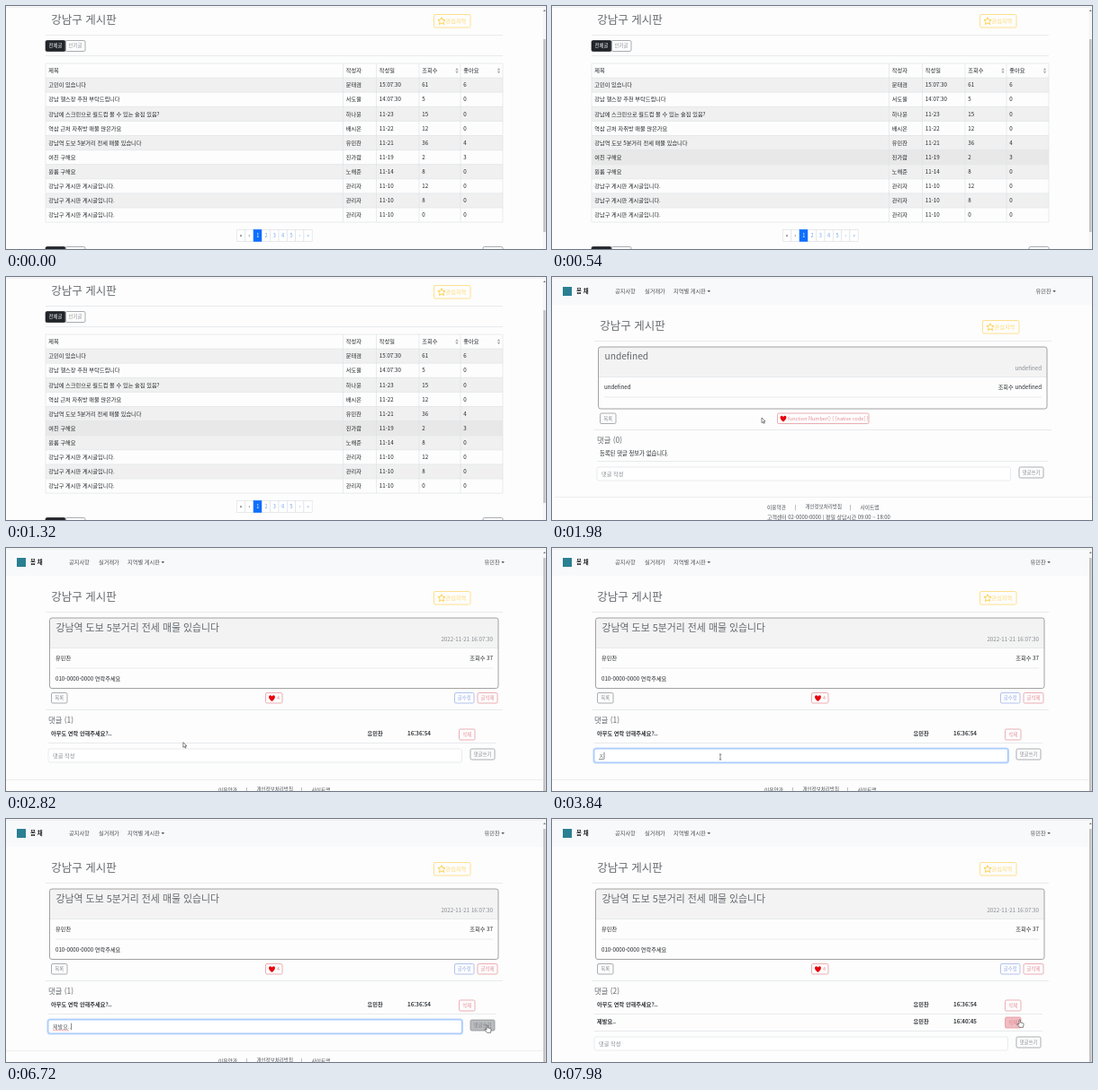
These frames come from a looping animation (600x271 px, 8000 ms). An HTML page:

```html
<!DOCTYPE html>
<html lang="ko">
<head>
<meta charset="utf-8">
<style>
html, body { margin: 0; width: 100%; height: 100%; overflow: hidden; background: #fdfdfd; }
svg { display: block; width: 600px; height: 271px; }
text { font-family: "Noto Sans CJK KR", "Noto Sans CJK", "Noto Serif", sans-serif; white-space: pre; }
</style>
</head>
<body>
<svg id="stage" viewBox="0 0 600 271"></svg>
<script>
const LOOP = 8000, OPEN = 1860, LOADED = 2100, FOCUS = 3060, SENT = 6840;
const INK = '#212529', SOFT = '#4c5157', TITLE = '#64696e', GRAY = '#858b91', LINE = '#dee2e6';
const RED = '#e48b94', GOLD = '#ffd970', BLUE = '#0d6efd';
const stage = document.getElementById('stage');

// y is the vertical middle of the text
const text = (x, y, s, size = 6.2, fill = INK, anchor = 'start', weight = 400) =>
  `<text x="${x}" y="${y + size * .36}" font-size="${size}" fill="${fill}" text-anchor="${anchor}" font-weight="${weight}">${s}</text>`;
const bold = (x, y, s) => text(x, y, s, 6.2, '#33373b', 'start', 700);
const rect = (x, y, w, h, fill, stroke = 'none', r = 0, sw = .7) =>
  `<rect x="${x}" y="${y}" width="${w}" height="${h}" rx="${r}" fill="${fill}" stroke="${stroke}" stroke-width="${sw}"/>`;
const path = (d, fill, stroke = 'none', sw = .7) =>
  `<path d="${d}" fill="${fill}" stroke="${stroke}" stroke-width="${sw}" stroke-linejoin="round"/>`;
const hline = (x1, x2, y, color = LINE) => path(`M${x1} ${y}H${x2}`, 'none', color);
const shift = (dx, s) => `<g transform="translate(${dx} 0)">${s}</g>`;
const button = (x, y, w, h, label, color = GRAY, fill = 'none', ink = color) =>
  rect(x, y, w, h, fill, color, 1.5) + text(x + w / 2, y + h / 2, label, 5.4, ink, 'middle');
const arrowDown = (x, y) => path(`M${x} ${y}h3.6l-1.8 2z`, SOFT);

function star(x, y) {
  const pts = Array.from({ length: 10 }, (_, i) => {
    const a = i * Math.PI / 5, r = i % 2 ? 2 : 4.3;
    return `${x + r * Math.sin(a)} ${y - r * Math.cos(a)}`;
  });
  return path('M' + pts.join('L') + 'Z', 'none', '#ffcb38', .9);
}

function heading(y) {
  return text(50.3, y, '강남구 게시판', 12.5, TITLE, 'start', 300) +
    rect(475.5, y - 6, 40.5, 14.5, 'none', GOLD, 1.5, .8) + star(484, y + 1.5) +
    text(488.5, y + 1.5, '관심지역', 6.2, GOLD);
}

const scrollbar = (y, h) => rect(596.5, 0, 3.5, 271, '#f6f6f6') + rect(597, y, 2.6, h, '#c3c3c3') +
  path('M597 6l1.3-2 1.3 2z', '#777');

const posts = [
  ['고민이 있습니다', '문태겸', '15:07:30', 61, 6],
  ['강남 헬스장 추천 부탁드립니다', '서도율', '14:07:30', 5, 0],
  ['강남에 스크린으로 월드컵 볼 수 있는 술집 있음?', '하나윤', '11-23', 15, 0],
  ['역삼 근처 자취방 매물 많은가요', '배시온', '11-22', 12, 0],
  ['강남역 도보 5분거리 전세 매물 있습니다', '유민찬', '11-21', 36, 4],
  ['여친 구해요', '진가람', '11-19', 2, 3],
  ['원룸 구해요', '노해준', '11-14', 8, 0],
  ...[12, 8, 0].map(n => ['강남구 게시판 게시글입니다.', '관리자', '11-10', n, 0])
];
const cols = [44, 374.5, 411.5, 459, 505, 552];

// hovered row: up from the bottom to the fourth, then around the fifth
function hoverRow(t) {
  if (t < 180) return -1;
  if (t < 960) return Math.max(3, 9 - Math.floor((t - 180) / 75));
  return t >= 1140 && t < 1500 ? 5 : 4;
}

function listPage(t) {
  const hover = hoverRow(t), rowY = i => 64 + i * 16.1;
  let s = heading(15.5) + hline(44, 552, 32.5) +
    rect(44, 38.5, 22, 12, INK, INK, 1.5) + text(55, 44.5, '전체글', 5.4, '#fff', 'middle') +
    button(66, 38.5, 22, 12, '인기글') + hline(44, 552, 55.5);
  posts.forEach((p, i) => {
    const y = rowY(i + 1);
    s += rect(44, y, 508, 16.1, i === hover ? '#e8e8e8' : i % 2 ? '#fdfdfd' : '#f0f0f0');
    p.forEach((v, c) => s += text(cols[c] + 3.3, y + 8, v));
  });
  ['제목', '작성자', '작성일', '조회수', '좋아요'].forEach((v, c) => s += text(cols[c] + 3.3, 72, v));
  for (let i = 0; i < 12; i++) s += hline(44, 552, rowY(i));
  cols.forEach(x => s += path(`M${x} 64V241`, 'none', LINE));
  [501, 547.5].forEach(x => s += path(`M${x - 1.7} 71.5l1.7-2.5 1.7 2.5zM${x - 1.7} 72.8l1.7 2.5 1.7-2.5z`, '#aaa'));
  [...'«‹12345›»'].forEach((c, i) => {
    const x = 256.5 + i * 9.3, on = c === '1';
    s += rect(x, 249.5, 9.3, 13, on ? BLUE : '#fff', on ? BLUE : LINE) +
      text(x + 4.65, 256, c, 5.6, on ? '#fff' : i < 2 ? INK : '#6ea0ee', 'middle');
  });
  return s + rect(44, 268.5, 22, 12, INK, INK, 1.5) + rect(66, 268.5, 22, 12, 'none', GRAY, 1.5) +
    rect(530, 268.5, 22, 12, 'none', GRAY, 1.5) + scrollbar(37, 215);
}

const navbar = userX => rect(0, 2, 600, 29, '#f8f9fa') + rect(12, 11, 10, 10, '#2b7f92') +
  text(27, 16, '봄 채', 6.4, INK, 'start', 700) + text(70, 16, '공지사항', 6.2, SOFT) + text(103, 16, '실거래가', 6.2, SOFT) +
  text(135, 16, '지역별 게시판', 6.2, SOFT) + arrowDown(172.5, 15) +
  text(userX, 16, '유민찬', 6.2, SOFT) + arrowDown(userX + 18.8, 15);

const footer = y => hline(0, 600, y, '#e6e8ea') + text(236, y + 11, '이용약관', 5.7, SOFT) +
  text(267.5, y + 11, '|', 5.7, SOFT, 'middle') + text(278.5, y + 11, '개인정보처리방침', 5.5, SOFT) +
  text(328.5, y + 11, '|', 5.7, SOFT, 'middle') + text(339.5, y + 11, '사이트맵', 5.7, SOFT) +
  text(236, y + 22.5, '고객센터 02-0000-0000 | 평일 상담시간 09:00 ~ 18:00', 5.9, SOFT);

const heart = (x, y) => path(`M${x} ${y + 3.4}C${x - 6.4} ${y - 1} ${x - 2.3} ${y - 5.6} ${x} ${y - 2}C${x + 2.3} ${y - 5.6} ${x + 6.4} ${y - 1} ${x} ${y + 3.4}Z`, '#e8000b');

const card = (h, title, size, date, author, views) =>
  rect(48.5, 78, 498.5, h, '#fdfdfd', 'none', 2.5) + rect(48.5, 78, 498.5, 33.5, '#f3f3f3', 'none', 2.5) +
  hline(48.5, 547, 111.5) + rect(48.5, 78, 498.5, h, 'none', '#8c8c8c', 2.5, .8) +
  text(55.5, 88.8, title, size, TITLE, 'start', 300) + text(541, 101.5, date, 6.2, GRAY, 'end') +
  text(55, 123, author) + text(541, 123, views, 6.2, INK, 'end') + hline(55, 541, 134);

const inputBox = (y, focused) =>
  (focused ? rect(46.6, y - .4, 460.3, 15.8, 'none', '#c3dafd', 2.5, 2.4) : '') +
  rect(47, y, 459.5, 15, '#fff', focused ? '#86b7fe' : LINE, 2);

function emptyPost() {
  return navbar(537.5) + shift(3, heading(54.5) + hline(44, 552, 71.5) +
    card(69, 'undefined', 10.2, 'undefined', 'undefined', '조회수 undefined') +
    button(50.5, 152, 17.5, 11.5, '목록') + rect(247.5, 152, 101.5, 11.5, 'none', RED, 1.5) + heart(254, 158) +
    text(259, 158, 'function Number() { [native code] }', 5.5, RED) +
    hline(44, 552, 170.5) + text(47, 182, '댓글 (0)', 8.4, TITLE) +
    text(50, 197, '등록된 댓글 정보가 없습니다.', 6.3) + hline(47, 548, 205.5) +
    inputBox(212, false) + text(52, 219.5, '댓글 작성', 6.2, GRAY) + button(516, 212, 27, 12, '댓글쓰기') +
    footer(245.5));
}

const keys = [[3600, 'ㅈ'], [3900, '제'], [4020, '젭'], [4200, '제바'], [4440, '제발'], [4620, '제발ㅇ'],
  [4980, '제발요'], [5820, '제발요.'], [6220, '제발요..']];

function typed(t, midY) {
  const [since, str] = keys.findLast(k => k[0] <= t) || [FOCUS, ''];
  if (!str) return text(52, midY, '댓글 작성', 6.2, GRAY) + caret(t - since, 52, midY);
  const dots = str.split('.').length - 1, end = 52 + (str.length - dots) * 5.6;
  const under = dots
    ? path(`M52 ${midY + 4}` + 'q.75-1 1.5 0t1.5 0'.repeat(6), 'none', '#e44', .5)
    : hline(end - 5.6, end, midY + 4, '#666');
  return text(52, midY, str, 6.1, '#5c6268') + under + caret(t - since, end + dots * 1.7 + .4, midY);
}
const caret = (age, x, y) => age % 1060 < 530 ? path(`M${x} ${y - 3.8}v7.6`, 'none', '#333', .6) : '';

const route = [[OPEN, 233, 157], [2400, 233, 157], [3000, 187, 233], [6120, 187, 233], [6300, 360, 256],
  [6480, 534, 230], [6960, 534, 230], [7340, 517, 225], [7560, 518, 208], [7680, 518, 208], [7900, 519, 224]];

function pointer(t) {
  const i = route.findIndex(k => k[0] > t);
  if (i < 0) return route.at(-1).slice(1);
  const [t0, x0, y0] = route[i - 1], [t1, x1, y1] = route[i];
  const u = (t - t0) / (t1 - t0), e = u * u * (3 - 2 * u);
  return [x0 + (x1 - x0) * e, y0 + (y1 - y0) * e];
}

function cursor(kind, x, y) {
  const d = {
    arrow: 'M0 0v5.6l1.3-1.2 1 2 .9-.4-.9-2h1.8z',
    hand: 'M0 0q.9-.6 1.3.3v2.6l3 .7q.9.3.8 1.3l-.6 3.4h-4l-2.6-3.2q0-1.2 1-.7l1.1.8z',
    beam: 'M-1.2-3h2.4M0-3v6M-1.2 3h2.4'
  }[kind];
  return `<g transform="translate(${x} ${y})">${path(d, kind === 'beam' ? 'none' : '#fff', '#333', .6)}</g>`;
}

function fullPost(t) {
  const sent = t >= SENT, inputY = sent ? 243 : 224, focused = t >= FOCUS && !sent;
  const [x, y] = pointer(t);
  const over = (bx, by, w, h) => x >= bx && x <= bx + w && y >= by && y <= by + h;
  let kind = over(47, inputY, 460, 15) ? 'beam' : 'arrow';
  const live = (bx, by, w, h, label, color, fill, ink) => {
    const on = over(bx, by, w, h);
    if (on) kind = 'hand';
    return on ? button(bx, by, w, h, label, color, fill, ink) : button(bx, by, w, h, label, color);
  };
  const comment = (cy, body, time) => bold(50, cy, body) + bold(401.5, cy, '유민찬') + bold(446, cy, time) +
    live(503.5, cy - 5, 17.5, 12, '삭제', RED, '#f0bdc2', '#d9808a') + hline(47, 545, cy + 10.5);

  let s = navbar(531.5) + heading(54.5) + hline(44, 552, 71.5) +
    card(78.5, '강남역 도보 5분거리 전세 매물 있습니다', 10.9, '2022-11-21 16:07:30', '유민찬', '조회수 37') +
    text(55, 145.5, '010-0000-0000 연락주세요') + button(50.5, 161.5, 17.5, 11.5, '목록') +
    rect(288.5, 161.5, 18.5, 11.5, 'none', RED, 1.5) + heart(295.5, 167.5) + text(301, 167.5, '4', 5.4, RED) +
    button(498.5, 161.5, 21.5, 11.5, '글수정', '#93aae8') + button(524, 161.5, 22, 11.5, '글삭제', RED) +
    hline(44, 552, 180.5) + text(47, 191.5, `댓글 (${sent ? 2 : 1})`, 8.4, TITLE) +
    comment(207, '아무도 연락 안해주세요?..', '16:36:54');
  if (sent) s += comment(226, '제발요..', '16:40:45');
  s += inputBox(inputY, focused) +
    (focused ? typed(t, inputY + 7.5) : text(52, inputY + 7.5, '댓글 작성', 6.2, GRAY)) +
    live(516, inputY, 27, 12, '댓글쓰기', GRAY, '#b9bbbd', '#7c8288') +
    footer(inputY + 34.5) + scrollbar(11, 260);
  return s + cursor(kind, x, y);
}

function scene(t) {
  const top = hline(0, 600, 1.2, '#e4e4e8');
  if (t < OPEN) return top + listPage(t);
  if (t < LOADED) return top + emptyPost() + cursor('arrow', ...pointer(t));
  return top + fullPost(t);
}

let last = '';
function tick(now) {
  const next = scene(now % LOOP);
  if (next !== last) stage.innerHTML = last = next;
  requestAnimationFrame(tick);
}
tick(performance.now());
</script>
</body>
</html>
```
